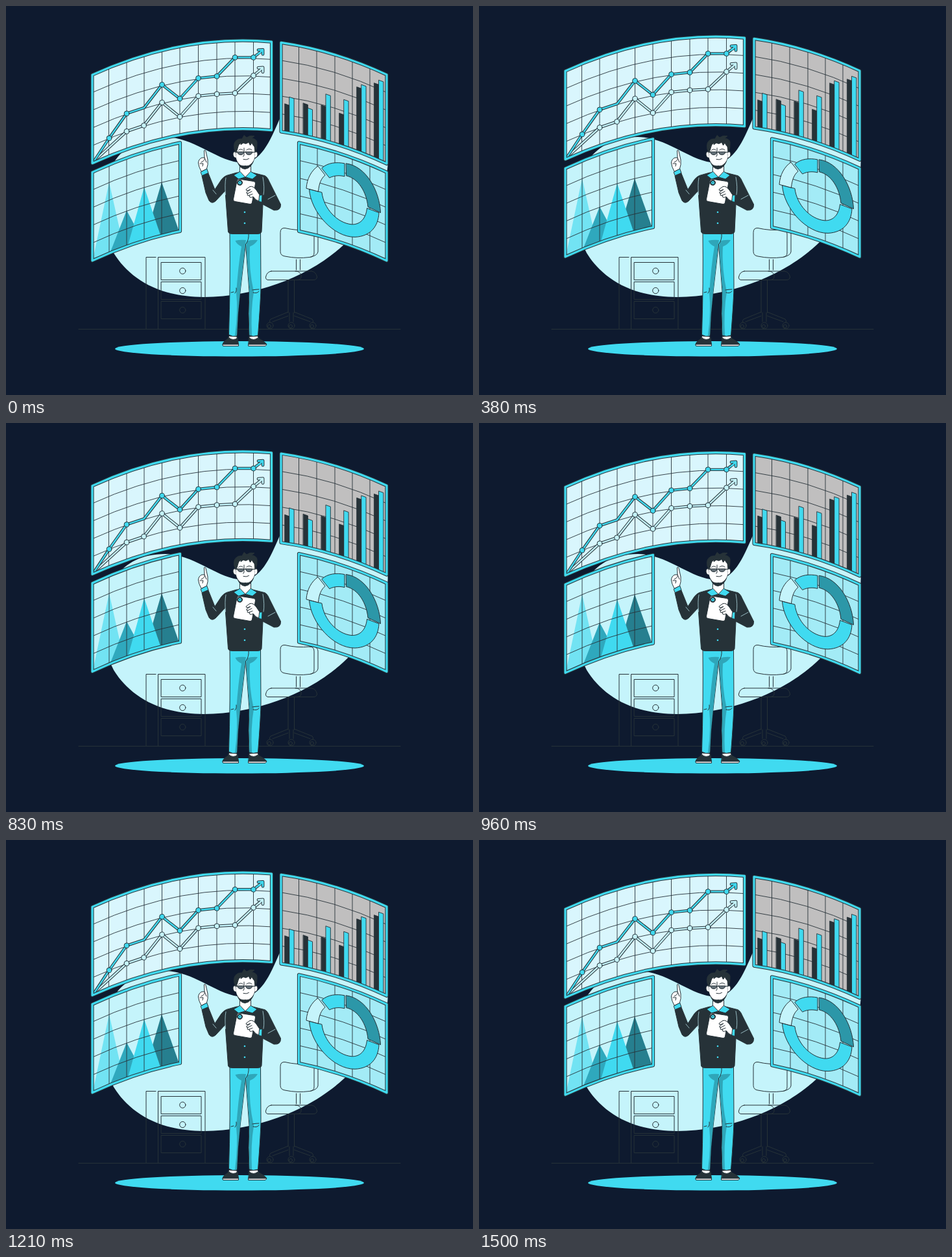
These frames come from a looping animation (720 by 600 pixels, 1540 ms). An HTML page:

```html
<!DOCTYPE html>
<html lang="en">
<head>
<meta charset="utf-8">
<title>Floating dashboards</title>
<style>
html, body { margin: 0; height: 100%; overflow: hidden; background: #0e1a2f; }
svg { display: block; }
.line { fill: none; }
.cyan { fill: #40daf0; }
.ink { fill: #263238; }
.shade { fill: #2fa6b9; stroke: none; }
.white { fill: #fff; }
</style>
</head>
<body>
<svg width="720" height="600" viewBox="0 0 720 600" stroke="#263238" stroke-linejoin="round" stroke-linecap="round">
  <path fill="#c5f4fb" stroke="none" d="M421 176C440 140 500 120 550 160C604 200 608 290 520 369C470 415 390 448 305 449C235 449 190 420 166 381C135 320 140 270 170 236C185 216 210 202 245 202C290 202 325 240 365 242C392 242 407 209 421 176Z"/>
  <ellipse class="cyan" stroke="none" cx="360" cy="528.800" rx="192" ry="11.800"/>

  <g class="line">
    <path d="M112 498.500H608"/>
    <path d="M231 387.500H216V498M234.500 498V387.500H307V498M239.500 395.500H301V422.500H239.500ZM239.500 425.500H301V452.500H239.500ZM239.500 455.500H301V482.500H239.500Z"/>
    <circle cx="272.300" cy="408.700" r="4.600"/>
    <circle cx="272.300" cy="439" r="4.600"/>
    <circle cx="272.300" cy="469" r="4.600"/>
    <path d="M423 349Q423 342 430 342.500Q449 347 468 345Q475 345 475 352V381Q475 387 468 387.500Q449 390 430 386Q423 385 423 379ZM468 345H474Q481 346 481 352V379Q480 385 470 387"/>
    <path d="M447.500 391V407M453.500 391V407M409 409H446Q453 409 455 415Q456 422.500 449 422.500H404Q400 422 400.500 418Q402 410 409 409ZM446 409H471Q478 410 479.500 418Q479 422.500 474 422.500H449"/>
    <path d="M435 423V473M444.500 423V473M435 472L408 483Q405 486 407 488M435 478L411 487M444.500 472L472 483Q475 486 473 488M444.500 478L469 487M437 473V487M443 473V487"/>
    <circle cx="407" cy="493" r="5"/><circle cx="440" cy="493" r="5"/><circle cx="473" cy="493" r="5"/>
    <circle cx="406" cy="494" r="2.500"/><circle cx="439" cy="494" r="2.500"/><circle cx="472" cy="494" r="2.500"/>
  </g>

  <g id="screens"></g>

  <g id="legs">
    <path class="cyan" d="M345 349Q346 430 343.500 507Q349 511 356 509Q357 475 361 441L369.500 367L375 440Q373 475 375 508Q382 511 388.500 508Q393 450 393 430L392.500 349Z"/>
    <path class="shade" d="M353.500 362Q361 360 370 361L369 368L361 441Q357 475 356 508L353 508Q358 470 355 443Q358 400 363 371Q356 368 353.500 362ZM388 361Q378 360 371 363L371 385L375.500 440Q374 475 376 508L379 508Q377 470 382 441Q374 405 376 371Q384 368 388 361Z"/>
    <path class="line" d="M374 351Q375 360 370 367M347 442L351 441M353 443Q356 440 355 435M380 438Q385 437 390 437M381 442Q387 444 390 440"/>
    <path class="white" d="M344 509L356 510L357 517H342ZM375 510L388 509L391 517H376Z"/>
    <path class="ink" d="M344 512Q350 517 357 512L358.500 522H334Q334 518 344 512ZM375 512Q382 517 388 512Q400 518 402 522H374Z"/>
    <path class="white" d="M334 522H358.500V524.500H335ZM374 522H402L400 524.500H374Z"/>
  </g>

  <g id="body">
    <path class="ink" d="M340 261.500Q334 264 330 271L322 283L311.500 257L302 262L308 288L313 300Q317 306 323 301L338 285L342.500 348Q343 351.500 350 351.500H387Q393.500 351.500 394 348L396 306L413 315Q424 316 423.500 306L406 271Q402 261 396 261L380 257H356Z"/>
    <path fill="none" stroke="#c5f4fb" stroke-width=".7" d="M339 265Q337 275 338.500 291M396 264Q399 280 397 291M319 284L324 290M404 298L415 292"/>
    <path class="white" d="M361 246H377.500V257L369 265L360.500 257Z"/>
    <path class="cyan" d="M360.500 255.500L351 261L358.500 267L368.500 264ZM377.500 255.500L387 261L380 267L369.500 264Z"/>
    <g class="cyan" stroke="none"><circle cx="368" cy="318" r="1.300"/><circle cx="368" cy="335" r="1.300"/></g>
    <path class="cyan" d="M300.500 256L309.500 250.500L312 257.500L302.500 261.500Z"/>
    <path class="white" d="M301 255Q297 248 296.500 242Q297 236 302 234L306 234L305.500 223Q307 221 308 224L311 237Q312 245 309.500 251Z"/>
    <path class="line" d="M301 241Q306 239 306.500 235M299 243L304 243L303 247M306 234L309 241"/>
    <path class="white" d="M359.500 267L382 270.500Q385 271 384.500 274L379.500 303Q379 306 376 305.500L353 301.500Q350 301 350.500 298L356 270Q357 266.500 359.500 267Z"/>
    <circle class="ink" cx="360.500" cy="272.500" r="4"/><circle class="cyan" cx="360.500" cy="272.500" r="2.500" stroke="none"/><circle class="ink" cx="360.500" cy="272.500" r=".8" stroke="none"/>
    <path class="white" d="M392 293L386 284Q381 277 376 278.500L370 283Q370 285.500 373 284.500L377 283L371 287Q370 290 373 289L372 291Q372 293.500 375 292L376 295Q379 296 381 294Q385 300 390 301Z"/>
    <path class="line" d="M373 289L379 286M375 292L380 290"/>
    <path class="cyan" d="M391 292L395 291.500L394.500 302.500L390 301.500Z"/>
  </g>

  <g id="head">
    <path class="white" d="M354 225Q350 224 350 229Q351 235 355 234ZM384 225Q388 224 388 229Q387 235 383 234Z"/>
    <path class="ink" d="M355 235Q359 251 368.500 251.500Q379 250 383 235Z"/>
    <path class="white" stroke="none" d="M354.500 215V233Q356 241 361 245Q365 247 369 246Q374 247 377 244Q382 240 383.500 233L384 213Q370 206 354.500 215Z"/>
    <path class="ink" d="M354.500 226L352 221Q350.500 212 354 208.500Q358 204 364 205L367 199.500L371 203Q376 199 383 200.500L379 204Q386 205 387 210Q388 219 384 226L383 217Q380 214 379 211L376.500 215L374 210Q370 214 366 211L362 214L362 211Q358 214 357.500 218Q357 222 354.500 226Z"/>
    <path class="line" d="M358.500 222.500Q361 219.500 365 222M371 222Q375 219 379 222M367 219V230Q367 232 365.500 232M355.500 225.500L383 225.500"/>
    <path fill="#66727a" d="M356.500 225H367Q366 229.500 362 229.500Q357.500 229.500 356.500 225ZM369.500 225H380Q379 229.500 374.500 229.500Q370 229.500 369.500 225Z"/>
    <path class="line" d="M366 236.500Q371 238 374.500 235.500"/>
  </g>
</svg>

<script>
const INK = '#263238', CYAN = '#40daf0', PALE = '#c5f4fb', BEND = 0.000986, LOOP = 1540;
const screens = document.getElementById('screens');

const path = (d, fill = 'none', extra = '') => `<path d="${d}" fill="${fill}" ${extra}/>`;
const outlined = (d, color, width) =>
  path(d, 'none', `stroke-width="${width + 2}"`) + path(d, 'none', `stroke="${color}" stroke-width="${width}"`);
const range = n => Array.from({ length: n }, (_, i) => i + 1);

// A bent screen: its top edge runs from (x0,y0) to (x1,y1), its sides are h high.
function screen({ x0, y0, x1, y1, h, fill, columns, under = '', over = () => '' }) {
  const w = x1 - x0, mx = (x0 + x1) / 2, my = (y0 + y1) / 2 - BEND * w * w / 2;
  const edge = dy => `${x0} ${y0 + dy}Q${mx} ${my + dy} ${x1} ${y1 + dy}`;
  const top = x => y0 + (y1 - y0) * (x - x0) / w - BEND * (x - x0) * (x1 - x);
  const outline = `M${edge(0)}V${y1 + h}Q${mx} ${my + h} ${x0} ${y0 + h}Z`;
  const grid = columns.map(x => `M${x} ${top(x)}v${h}`).join('') +
    range(4).map(i => 'M' + edge(h * i / 5)).join('');
  return path(outline, fill, 'stroke="none"') + under + path(grid, 'none', 'stroke-width=".9"') +
    over(x => top(x) + h) + outlined(outline, CYAN, 3.2);
}

function trend(points, arrowY, color, bare) {
  const line = 'M' + points.map(p => p.join(' ')).join('L') + `L395 ${arrowY + 1}`;
  const dots = points.slice(1).filter(p => p[0] !== bare)
    .map(([x, y]) => `<circle cx="${x}" cy="${y}" r="3.900" fill="${color}"/>`).join('');
  return outlined(line, color, 2.4) + outlined(`M389 ${arrowY}L396 ${arrowY - 0.5}V${arrowY + 6.5}`, color, 2.8) +
    path(`M390 ${arrowY + 5.5}L395.500 ${arrowY}`, 'none', `stroke="${color}" stroke-width="2.4"`) + dots;
}

const bars = base => [
  [430, 151, 140.5], [458.4, 150, 157.5], [486.2, 153, 136],
  [514, 165.5, 144.5], [541, 125, 121.5], [567.8, 119, 114.5]
].map(([x, dark, light]) => {
  const bar = (l, y, fill) =>
    path(`M${l} ${y}l7 2.500V${base(l + 7)}L${l} ${base(l)}Z`, fill, 'stroke-width=".9"');
  return bar(x, dark, INK) + bar(x + 7.1, light, CYAN);
}).join('');

const peaks = [
  ['M134 391L159 272L182 375Z', '#72e3f3'],
  ['M160 382L186 315.500L212 364Z', '#2fa8bd'],
  ['M213 364L240 272L267 348Z', '#267f8f'],
  ['M187 373L213 279.500L239 356Z', CYAN]
].map(([d, fill]) => path(d, fill, 'stroke="none"')).join('');

const ring = [
  ['M467.500 283C470 318 505 357 538 356.500C562 355.500 574 340 575 319L556.500 312C555 328 546 337.500 533 337C511 335 490 313 487 288Z', CYAN],
  ['M524.500 243C555 247 576 285 577.500 319L558 310C556 287 543 266 525 262Z', '#2c97a8'],
  ['M487 250C496 241.500 510 240.500 522 243L522 263C514 261 506 261.500 499 265Z', CYAN],
  ['M463 281C464 266 471 254 481 247L492 261C486 266 482.500 274 481.500 286Z', PALE]
].map(([d, fill]) => path(d, fill)).join('');

const start = [136, 239];
const lowTrend = [start, [186, 193.5], [212.5, 184.5], [240.5, 149], [268, 171], [296.5, 139], [325, 136], [353, 134.5], [381.5, 107.5]];
const highTrend = [start, [159, 204], [186, 166], [213, 157], [240.5, 121.5], [268, 143], [296.5, 111.5], [325, 108.5], [353, 79.5], [381.5, 79.5]];

screens.innerHTML =
  screen({ x0: 133, y0: 256.5, x1: 268.5, y1: 211, h: 136.5, fill: PALE,
    columns: [159, 186, 213, 240], under: peaks }) +
  screen({ x0: 451.5, y0: 211, x1: 587, y1: 256.5, h: 136.5, fill: '#a3ebf6',
    columns: [480, 507, 534, 561], over: () => ring }) +
  screen({ x0: 133, y0: 106.3, x1: 409.5, y1: 55.2, h: 136.5, fill: '#d9f6fd',
    columns: [158.5, 186, 213, 240.5, 268, 296.5, 325, 353, 381.5],
    over: () => trend(lowTrend, 95.5, PALE) + trend(highTrend, 68, CYAN, 213) }) +
  screen({ x0: 424, y0: 56.5, x1: 587, y1: 106, h: 137.5, fill: '#c0bfbf',
    columns: [451.5, 479, 507, 534, 561], over: bars });

// Lowest at 1500 ms, highest at 705 ms; the easing is softer than a plain cosine.
function lift(t) {
  const p = t < 705 ? (t + 40) / 745 : t < 1500 ? (1500 - t) / 795 : (t - 1500) / 745;
  return 0.7 * (1 - Math.cos(Math.PI * p)) / 2 + 0.3 * p;
}

function draw() {
  const y = 0.1 - 10.5 * lift(performance.now() % LOOP);
  screens.setAttribute('transform', `translate(0 ${y.toFixed(2)})`);
  requestAnimationFrame(draw);
}
draw();
</script>
</body>
</html>
```
